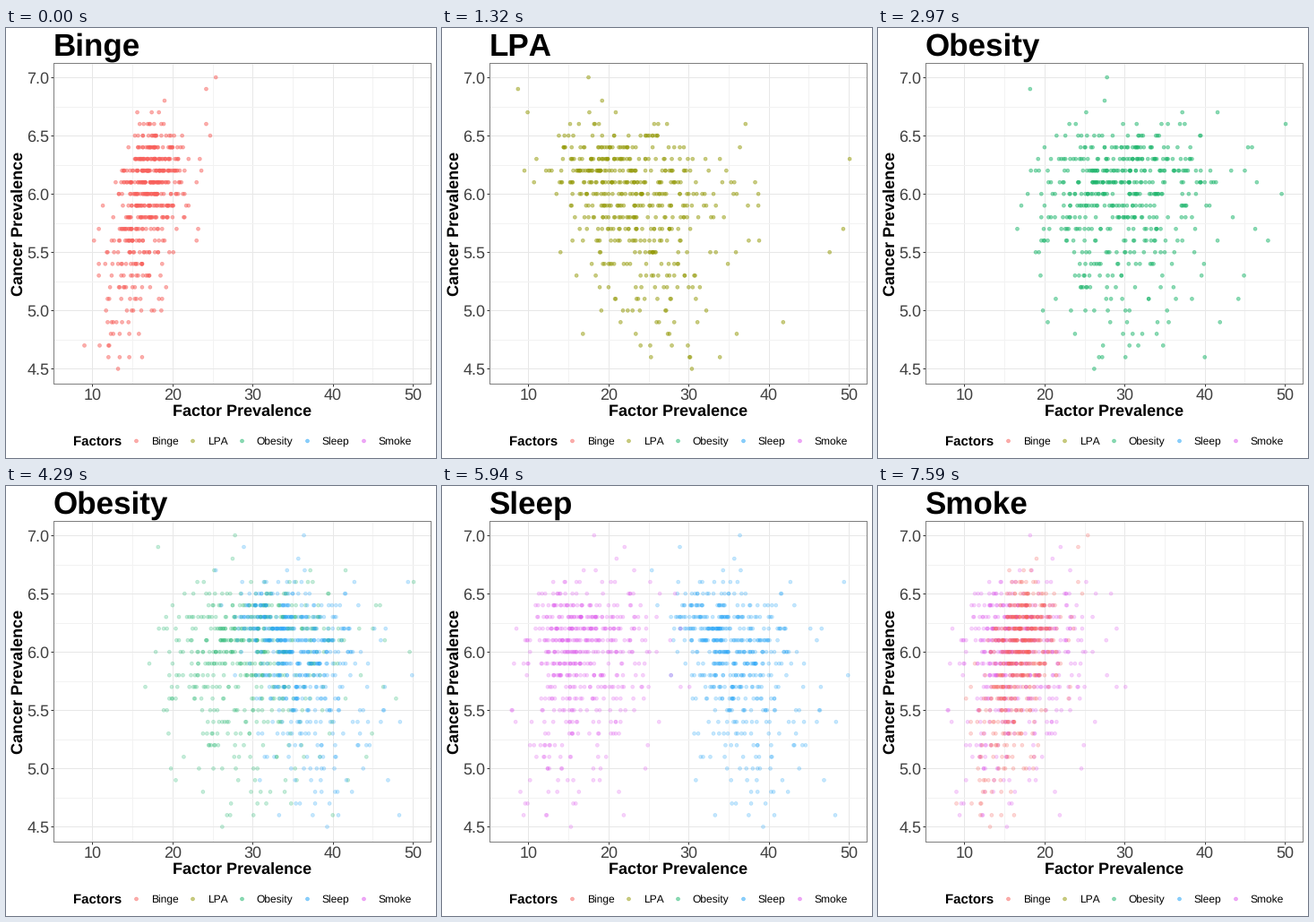
Animation of 480 by 480 pixels, one loop 7.92 s. Source, as a matplotlib script:

```python
import numpy as np
import matplotlib.pyplot as plt
from matplotlib.animation import FuncAnimation

SIZE, DPI = 480, 100
PX = 72 / DPI
STEP_MS, STEPS, BLOCK = 330, 24, 5
SOLID, FADED = 0.5, 0.25

# plain advance widths: kerning scaled down to nothing
plt.rcParams.update({"font.family": "Liberation Sans",
                     "text.kerning_factor": 6,
                     "text.hinting": "no_hinting"})

# colour, x centre at y = 6, slope, spread, gamma shape (low = long right tail),
# x of the highest and the lowest city
FACTORS = {
    "Binge": ("#F8615C", 17.2, 2.8, 2.2, 40, (25.4, 13.2)),
    "LPA": ("#959B0A", 23.3, -4.0, 5.8, 7, (17.5, 30.4)),
    "Obesity": ("#1DB66C", 30.0, 0.5, 5.6, 40, (27.8, 26.2)),
    "Sleep": ("#1FA3F8", 35.3, -3.0, 3.7, 9, (36.4, 39.3)),
    "Smoke": ("#DF56EF", 17.0, 1.5, 3.8, 10, (18.2, 15.3)),
}
NAMES = list(FACTORS)


def row_count(y):
    """Cities in a row: steep above the peak, long tail below it."""
    d = y - 6.15
    drop = (d / 0.23) ** 2 / 2 if d > 0 else (-d / 0.6) ** 1.1
    return max(1, round(60 * np.exp(-drop)))


def make_points(centre, slope, spread, shape, ends, seed):
    rng = np.random.default_rng(seed)
    rows = np.arange(46, 70) / 10
    y = np.repeat(rows, [row_count(row) for row in rows])
    noise = (rng.gamma(shape, size=y.size) - shape) / np.sqrt(shape)
    x = np.clip(centre + slope * (y - 6) + spread * noise, 7.3, 50.1)
    return np.append(np.round(x, 1), ends), np.append(y, [7.0, 4.5])


fig = plt.figure(figsize=(SIZE / DPI, SIZE / DPI), dpi=DPI, facecolor="white")

# page axes measured in pixels from the top left
page = fig.add_axes([0, 0, 1, 1])
page.set(xlim=(0, SIZE), ylim=(SIZE, 0))
page.axis("off")


def label(x, y, text, size, **style):
    return page.text(x, y, text, fontsize=size * PX, va="baseline", **style)


def dots(ax, x, y, color):
    # one size per dot keeps positions off the pixel grid
    sizes = np.full(len(x), (3.9 * PX) ** 2)
    return ax.scatter(x, y, s=sizes, facecolor=color, edgecolor=color,
                      linewidth=0.7 * PX, alpha=SOLID, zorder=3)


LEFT, TOP, WIDTH, HEIGHT = 53.2, 38.8, 421, 357.9
panel = fig.add_axes([LEFT / SIZE, 1 - (TOP + HEIGHT) / SIZE,
                      WIDTH / SIZE, HEIGHT / SIZE])
X_LIM, Y_LIM = (5.16, 52.24), (4.375, 7.125)
X_TICKS, Y_TICKS = np.arange(10, 51, 10), np.arange(4.5, 7.1, 0.5)
panel.set(xlim=X_LIM, ylim=Y_LIM, xticks=X_TICKS, yticks=Y_TICKS)
panel.set_xticks(X_TICKS[:-1] + 5, minor=True)
panel.set_yticks(Y_TICKS[:-1] + 0.25, minor=True)
panel.set_axisbelow(True)
panel.grid(which="major", color="#e7e7e7", linewidth=PX)
panel.grid(which="minor", color="#f2f2f2", linewidth=PX)
panel.tick_params(which="both", length=0, labelbottom=False, labelleft=False)
panel.tick_params(which="major", length=2.75 * PX, width=PX, color="#333333")
for spine in panel.spines.values():
    spine.set(color="#7f7f7f", linewidth=PX)

for v in X_TICKS:
    x = LEFT + (v - X_LIM[0]) / (X_LIM[1] - X_LIM[0]) * WIDTH
    label(x, 415, f"{v}", 18, ha="center", color="#404040")
for v in Y_TICKS:
    y = TOP + (Y_LIM[1] - v) / (Y_LIM[1] - Y_LIM[0]) * HEIGHT
    label(48.5, y + 6.4, f"{v:.1f}", 18, ha="right", color="#404040")

title = label(53, 31, NAMES[0], 35, weight="bold")
label(264, 433, "Factor Prevalence", 18, ha="center", weight="bold")
label(18.8, 218.2, "Cancer Prevalence", 18, ha="center", weight="bold",
      rotation=90, rotation_mode="anchor")

label(75.4, 466, "Factors", 15, weight="bold")
legend_x = [145.5, 208.5, 263.5, 336.5, 399.5]
dots(page, legend_x, [461] * 5, [spec[0] for spec in FACTORS.values()])
for name, x in zip(NAMES, legend_x):
    label(x + 16.3, 465.3, name, 12)

clouds = [dots(panel, *make_points(*shape, seed), color)
          for seed, (color, *shape) in enumerate(FACTORS.values())]


def draw(frame):
    # each block of steps ends with one crossfade into the next factor
    state, phase = divmod(frame + 1, BLOCK)
    following = (state + 1) % len(NAMES)
    fading = phase == BLOCK - 1
    for i, cloud in enumerate(clouds):
        cloud.set_visible(i == state or (fading and i == following))
        cloud.set_alpha(FADED if fading else SOLID)
        cloud.set_zorder(4 if i == following else 3)
    title.set_text(NAMES[state])
    return [title, *clouds]


anim = FuncAnimation(fig, draw, frames=STEPS, interval=STEP_MS,
                     repeat=True, repeat_delay=0, blit=False)
plt.show()
```
